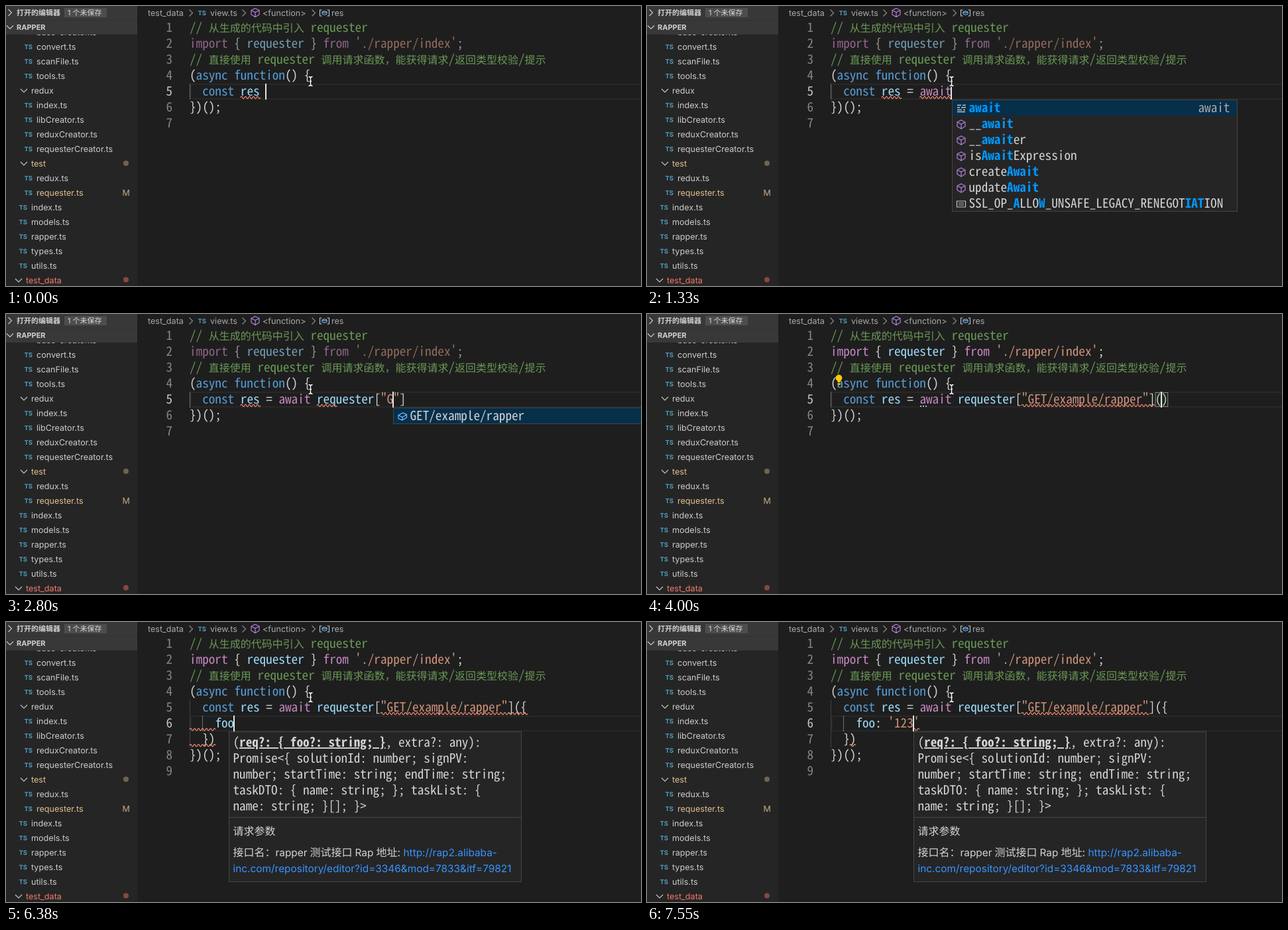
An HTML page that plays this animation: 958x422 px, repeating every 7.99 s.

```html
<!DOCTYPE html>
<html lang="zh-CN">
<head>
<meta charset="utf-8">
<title>Editor completion</title>
<style>
html, body { margin: 0; width: 100%; height: 100%; overflow: hidden; background: #1e1e1e; }
svg { display: block; width: 958px; height: 422px; }
text { white-space: pre; text-rendering: geometricPrecision; fill: #d4d4d4; }
.mono { font: 16px "Noto Sans Mono", monospace; }
.cjkmono .mono { font: 19.2px "Noto Sans Mono CJK SC", monospace; }
.mono .hit { font-weight: 700; fill: #0097fb; }
.mono .param { font-weight: 700; text-decoration: underline; }
.ui { font: 12.6px Inter, "Noto Sans CJK SC", sans-serif; }
.doc { font: 15.4px Inter, sans-serif; }
.han { font: 16px "Noto Sans CJK SC", sans-serif; }
.small { font: 11px Inter, "Noto Sans CJK SC", sans-serif; }
.title { font: 700 11px Inter, "Noto Sans CJK SC", sans-serif; }
.ts { font: 700 9.5px Inter, sans-serif; fill: #519aba; }
</style>
</head>
<body>
<svg viewBox="0 0 958 422">
  <rect width="958" height="422" fill="#1e1e1e"/>
  <g id="frame"></g>
  <g id="editor"></g>
  <g id="pointer"></g>
</svg>
<script>
const LOOP = 7990, LEFT = 277, CHAR = 9.6, ROW = 24;
const svg = document.querySelector('svg');
const $ = id => document.getElementById(id);

// The half-width CJK mono face has the closest letter shapes; use it where present.
const probe = document.createElement('canvas').getContext('2d');
probe.font = '20px "Noto Sans Mono CJK SC", "Noto Serif"';
if (Math.abs(probe.measureText('iiiiiiiiii').width - 100) < 1) svg.classList.add('cjkmono');

const esc = s => s.replace(/&/g, '&amp;').replace(/</g, '&lt;');
const colX = col => LEFT + col * CHAR;
const lineTop = line => 21 + (line - 1) * ROW;
const edge = col => Math.round(colX(col) + .2) + .5;
const put = (cls, x, y, s, fill) =>
  `<text class="${cls}" x="${x}" y="${y}" ${fill ? `style="fill:${fill}"` : ''}>${esc(s)}</text>`;
const box = (x, y, w, h, fill, border = 'none', more = '') =>
  `<rect x="${x}" y="${y}" width="${w}" height="${h}" fill="${fill}" stroke="${border}" ${more}/>`;
const stroke = (d, color, width = 1.1) =>
  `<path d="${d}" fill="none" stroke="${color}" stroke-width="${width}"/>`;
const iconPath = (x, y, d, color, width = 1.2) =>
  `<g transform="translate(${x} ${y})">${stroke(d, color, width)}</g>`;
const dot = (x, y, color) => `<circle cx="${x}" cy="${y}" r="4" fill="${color}"/>`;
const chevron = (x, y, down, color = '#c5c5c5') =>
  iconPath(x, y, down ? 'M-5-2.5l5 5l5-5' : 'M-2.5-5l5 5l-5 5', color);
const cube = (x, y) =>
  iconPath(x, y, 'M0-6.500l6 3v6.500l-6 3.500l-6-3.500v-6.500zM-6-3.500l6 3l6-3M0-.5v7', '#b180d7');

// ---- static frame: file tree, breadcrumb, mouse pointer ----
function sidebar() {
  const plain = '#cccccc', changed = '#e2c08d', failed = '#f07a68';
  const rows = [
    ['base-creator.ts', 46], ['convert.ts', 46], ['scanFile.ts', 46], ['tools.ts', 46],
    ['redux', 38, plain, 1], ['index.ts', 46], ['libCreator.ts', 46], ['reduxCreator.ts', 46],
    ['requesterCreator.ts', 46], ['test', 38, changed, 1], ['redux.ts', 46], ['requester.ts', 46, changed],
    ['index.ts', 38], ['models.ts', 38], ['rapper.ts', 38], ['types.ts', 38], ['utils.ts', 38],
    ['test_data', 30, failed, 1]];
  let out = box(0, 0, 198, 422, '#252526');
  rows.forEach(([name, x, color = plain, folder], i) => {
    const y = 40 + 22 * i;
    out += folder ? chevron(x - 11, y - .5, true) : put('ts', x - 18.5, y + 3, 'TS');
    out += put('ui', x, y + 4, name, color);
  });
  out += dot(181, 237, '#6f6350') + dot(181, 412.5, '#86483f') + put('ui', 175.5, 286, 'M', '#c9ac80');
  out += box(0, 0, 198, 43, '#383838') + box(0, 21, 198, 1, '#333334');
  out += chevron(6, 10, false) + put('title', 16, 14, '打开的编辑器', '#d0d0d0');
  out += box(88, 3, 64, 14, '#4d4d4d') + put('small', 93, 14, '1 个未保存', '#dddddd');
  return out + chevron(6, 32, true) + put('title', 16, 36, 'RAPPER', '#d0d0d0');
}
function breadcrumb() {
  const gray = '#a9a9a9';
  return put('ui', 214, 15, 'test_data', gray) + put('ts', 289.5, 14, 'TS') +
    put('ui', 308, 15, 'view.ts', gray) + put('ui', 387, 15, '<function>', gray) +
    put('ui', 491, 15, 'res', gray) + cube(376, 10) +
    [279, 359, 464].map(x => chevron(x, 10.5, false, '#8a8a8a')).join('') +
    stroke('M476.5 6h-3v9h3M484.5 6h3v9h-3', '#c5c5c5') +
    stroke('M477 9l3.5-1.5l3.5 1.5v3l-3.5 1.5l-3.5-1.5zM477 9l3.5 1.5l3.5-1.5', '#75beff');
}
function pointer() {
  const beam = 'M456.5 106.5q3 0 3 2.5q0-2.5 3-2.5M459.5 109v9M456.5 120.5q3 0 3-2.5q0 2.5 3 2.5M458 113.5h3';
  return stroke(beam, '#111', 3.4) + stroke(beam, '#fff', 1.4);
}

// ---- code ----
const TOKEN = /(\/\/.*)|('[^']*'?|"[^"]*"?)|\b(const|async|function)\b|\b(import|from|await)\b|([a-z]\w*)|\s+|[^\sa-z'"]+/gi;
const COLORS = ['#6a9955', '#ce9178', '#569cd6', '#c586c0', '#9cdcfe'];
function codeLine(s, line) {
  let x = LEFT, out = '';
  for (const m of s.matchAll(TOKEN)) {
    const kind = m.slice(1).findIndex(Boolean);
    for (const part of m[0].match(/[\u3000-\uffff]+|[^\u3000-\uffff]+/g)) {
      const han = part.charCodeAt(0) >= 0x3000;
      if (part.trim()) out += put(han ? 'han' : 'mono', x, lineTop(line) + 18, part, COLORS[kind]);
      x += part.length * (han ? 16 : CHAR);
    }
  }
  return out;
}
function squiggle([line, col, len]) {
  const n = Math.round(len * CHAR / 3);
  return stroke(`M${colX(col)} ${lineTop(line) + 21}q1.5-3.4 3 0` + 't3 0'.repeat(n - 1), '#f48771', 1.2);
}

// ---- widgets ----
const icons = {
  cube,
  field: (x, y) => iconPath(x, y, 'M-6-2l6.5-3.5l6 2.5v4.5l-6.5 4l-6-2.5zM-6-2l6 3l6.5-4M0 1v4', '#75beff'),
  key: (x, y) => iconPath(x, y, 'M-6-5h6M2-5h5M-6-1.5h4M0-1.5h7M-6 2h7M3 2h3M-6 5h12', '#c5c5c5', 1.4),
  text: (x, y) => iconPath(x, y, 'M-6.5-4.5h13v9h-13zM-4-1.5h8M-4 1.5h8', '#c5c5c5'),
  snippet: (x, y) => iconPath(x, y, 'M-5.5-6h11.5v12h-11.5z', '#d0d0d0') +
    `<path d="M${x - 3} ${y + 6}h7" stroke="#252526" stroke-width="2" stroke-dasharray="1.5 1.5"/>`
};
function suggest({ col, line = 5, width = 430, items, detail, scroll }) {
  const x = edge(col), y = lineTop(line + 1) + .5;
  let out = box(x, y, width, items.length * ROW, '#252526', '#454545') +
    box(x + .5, y + .5, width - 1, ROW - 1, '#062f4a');
  items.forEach(([icon, label], i) => {
    const spans = label.split('*').map((s, k) => k % 2 ? `<tspan class="hit">${s}</tspan>` : s).join('');
    out += icons[icon](x + 13.5, y + 13 + i * ROW) +
      `<text class="mono" x="${x + 25}" y="${y + 18.5 + i * ROW}">${spans}</text>`;
  });
  if (detail) out += put('mono', x + width - 11 - detail.length * CHAR, y + 18.5, detail, '#a5a8aa');
  if (scroll) out += box(x + width - 11, y + .5, 10, 115, '#4b4b4c');
  return out;
}
function propertyDoc() {
  return box(645.5, 165.5, 330, 73, '#252526', '#454545') +
    put('mono', 652, 188, '(property) foo?: string', '#a2a2a2') +
    put('han', 651, 228, '请求属性示例') + stroke('M952 174l7 7M952 181l7-7', '#c5c5c5');
}
function hint({ col, line }) {
  const x = edge(col), y = lineTop(line + 1) + .5, link = '#3794ff';
  const rows = ['(<tspan class="param">req?: { foo?: string; }</tspan>, extra?: any):',
    'Promise&lt;{ solutionId: number; signPV:', 'number; startTime: string; endTime: string;',
    'taskDTO: { name: string; }; taskList: {', 'name: string; }[]; }>'];
  return box(x, y, 441, 226, '#252526', '#454545') +
    rows.map((s, i) => `<text class="mono" x="${x + 6}" y="${y + 22.5 + i * ROW}">${s}</text>`).join('') +
    stroke(`M${x} ${y + 129}h441`, '#454545', 1) +
    put('han', x + 6, y + 155.5, '请求参数') + put('han', x + 6, y + 187.5, '接口名：') +
    put('doc', x + 70, y + 187.5, 'rapper') + put('han', x + 122, y + 187.5, '测试接口') +
    put('doc', x + 190, y + 187.5, 'Rap') + put('han', x + 222, y + 187.5, '地址:') +
    put('doc', x + 263, y + 187.5, 'http://rap2.alibaba-', link) +
    put('doc', x + 6, y + 211.5, 'inc.com/repository/editor?id=3346&mod=7833&itf=79821', link);
}
const bulb = () => '<path d="M287.5 103v-2q-3-2-3-4.5a5 5 0 0 1 10 0q0 2.5-3 4.5v2z" fill="#ffcc00"/>' +
  box(287.5, 104, 4, 3, '#e0b400');

// ---- timeline: each step changes part of the state ----
const awaitItems = [['key', '*await*'], ['cube', '__*await*'], ['cube', '__*await*er'], ['cube', 'is*Await*Expression'],
  ['cube', 'create*Await*'], ['cube', 'update*Await*'], ['text', 'SSL_OP_*A*LLO*W*_UNSAFE_LEGACY_RENEGOT*IAT*ION']];
const firstItems = [['key', '*aw*ait'], ...['__*aw*ait', '__*aw*aiter', 'is*Aw*aitExpression', 'create*Aw*ait', 'update*Aw*ait',
  '*a*llo*w*JS', '*a*rro*w*', '*a*llo*w*ed', 'dr*aw*', 'r*aw*', 'l*aw*'].map(s => ['cube', s])];
const requestItems = ['*req*uester', '*Req*uest', '*Req*uestInit', '*req*uestAnimationFrame', '*req*uire'].map(s => ['cube', s]);
const fooItems = [['field', 'foo?'], ...['/** Document This */', '#endregion', '#region', 'class', 'ctor', 'dowhile', 'error',
  'for', 'foreach =>', 'forin'].map(s => ['snippet', s])];
const awaiting = col => ({ col, items: awaitItems, detail: 'await' });
const requesting = col => ({ col, items: requestItems });
const keyList = col => ({ col, items: [['field', 'GET/example/rapper']] });
const hintAt = (col, line = 6) => ({ col, line });
const CALL = '= await requester["GET/example/rapper"]';

const steps = [
  [0, { tail: '', body: null, back: 0, cursor: true, squiggles: [[5, 8, 3]] }],
  [300, { tail: '=' }],
  [450, { tail: '= ' }],
  [600, { tail: '= a' }],
  [750, { tail: '= aw', list: { col: 15, items: firstItems } }],
  [890, { tail: '= awa', list: awaiting(17) }],
  [1040, { tail: '= awai', list: awaiting(18) }],
  [1180, { tail: '= await', list: awaiting(18) }],
  [1330, { list: awaiting(19), squiggles: [[5, 8, 3], [5, 14, 5]] }],
  [1470, { tail: '= await ', list: null }],
  [1620, { tail: '= await r' }],
  [1770, { tail: '= await req', list: requesting(21) }],
  [1920, { tail: '= await reque', list: requesting(23), squiggles: [[5, 8, 3], [5, 20, 3]] }],
  [2070, { tail: '= await request', list: requesting(25) }],
  [2220, { tail: '= await requester', list: null }],
  [2370, { tail: '= await requester[]', back: 1 }],
  [2510, { tail: '= await requester[""]', back: 2, list: keyList(31) }],
  [2660, { tail: '= await requester["G"]', list: keyList(32) }],
  [2810, { tail: '= await requester["GE"]' }],
  [2960, { tail: '= await requester["GET"]', list: keyList(34) }],
  [3100, { tail: CALL, list: null, used: true }],
  [3250, { back: 0, squiggles: [] }],
  [3400, { squiggles: [[5, 30, 20]] }],
  [3550, { bulb: true, dots: true }],
  [3850, { tail: CALL + '()', back: 1, match: 51 }],
  [4000, { squiggles: [[5, 30, 21]] }],
  [4150, { hint: hintAt(52, 5) }],
  [4300, { squiggles: [[5, 30, 23]] }],
  [4600, { tail: CALL + '({})', back: 2, match: 52 }],
  [4750, { tail: CALL + '({', body: '', back: 0, match: 0, hint: null, dots: false }],
  [4890, { hint: hintAt(4), squiggles: [[5, 30, 23], [6, 0, 4], [7, 0, 4]] }],
  [5040, { cursor: false, list: { col: 4, line: 6, width: 329, items: fooItems, scroll: true }, doc: true }],
  [5180, { bulb: false }],
  [5480, { cursor: true }],
  [5930, { cursor: false }],
  [6380, { cursor: true, body: 'foo', list: null, doc: false, hint: hintAt(6.1) }],
  [6520, { body: 'foo:', hint: hintAt(7) }],
  [6670, { body: 'foo: ', hint: hintAt(8) }],
  [6820, { body: "foo: ''", back: 1, hint: hintAt(9) }],
  [6960, { hint: hintAt(10), squiggles: [[5, 30, 20], [6, 10, 1], [7, 3, 1]] }],
  [7110, { body: "foo: '1'" }],
  [7260, { hint: hintAt(11), squiggles: [[5, 30, 20], [6, 11, 1], [7, 3, 1]] }],
  [7400, { body: "foo: '12'" }],
  [7550, { body: "foo: '123'", hint: hintAt(13), squiggles: [[5, 30, 20], [6, 13, 1], [7, 3, 1]] }]
];
let last = {};
const states = steps.map(([at, change]) => (last = { ...last, ...change, at }));

function draw(s) {
  const isOpen = s.body !== null, active = isOpen ? 6 : 5;
  const lines = ['// 从生成的代码中引入 requester', "import { requester } from './rapper/index';",
    '// 直接使用 requester 调用请求函数，能获得请求/返回类型校验/提示', '(async function() {',
    '  const res ' + s.tail, ...(isOpen ? ['    ' + s.body, '  })'] : []), '})();', ''];
  const y = lineTop(active);
  const guide = (col, from, to, color) =>
    stroke(`M${Math.round(colX(col)) + .5} ${lineTop(from)}V${lineTop(to + 1)}`, color, 1);
  let out = box(279, y + 1, 700, ROW - 2, 'none', '#282828', 'stroke-width="2"');
  out += guide(0, 5, isOpen ? 7 : 5, isOpen ? '#404040' : '#707070');
  if (isOpen) out += guide(2, 6, 6, '#707070');
  lines.forEach((text, i) => {
    const n = i + 1;
    out += put('mono', 241.6, lineTop(n) + 18, String(n), n === active ? '#c6c6c6' : '#858585');
    out += `<g opacity="${n === 2 && !s.used ? .667 : 1}">${codeLine(text, n)}</g>`;
  });
  if (s.match) out += [0, 1].map(k => box(colX(s.match + k) + .5, y + 1.5, 9, 21, '#00640019', '#888888')).join('');
  out += s.squiggles.map(squiggle).join('');
  if (s.dots) out += [0, 4, 8].map(d => box(412 + d, 138, 2, 2, '#b0b0b0')).join('');
  if (s.bulb) out += bulb();
  const col = lines[active - 1].length - s.back;
  if (s.cursor) out += box(Math.round(colX(col)) - 1, y, 2, ROW, '#e4e4e4');
  if (s.hint) out += hint(s.hint);
  if (s.list) out += suggest(s.list);
  if (s.doc) out += propertyDoc();
  $('editor').innerHTML = out;
}

$('frame').innerHTML = sidebar() + breadcrumb();
$('pointer').innerHTML = pointer();
let shown;
function tick() {
  const t = performance.now() % LOOP;
  const state = states.filter(s => s.at <= t).pop();
  if (state !== shown) draw(shown = state);
  requestAnimationFrame(tick);
}
tick();
</script>
</body>
</html>
```
